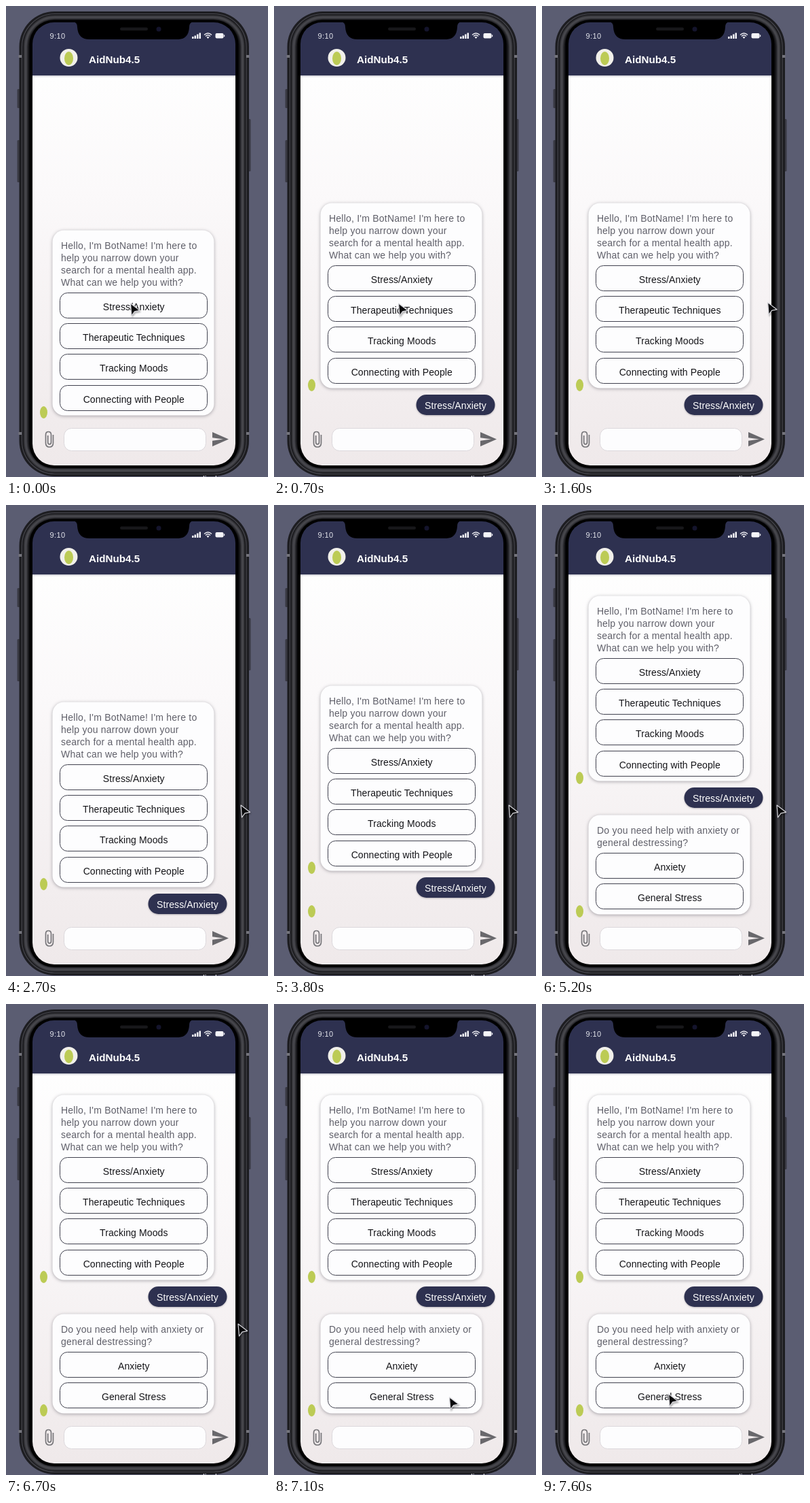
Animation, 386 px wide and 692 px high, one loop 8000 ms. Source, as an HTML page:

```html
<!DOCTYPE html>
<html lang="en">
<head>
<meta charset="utf-8">
<title>Chat assistant</title>
<style>
  html, body { margin: 0; width: 100%; height: 100%; overflow: hidden; background: #5b5d72; }
  svg { display: block; width: 100vw; height: 100vh; }
  text { font-family: "Liberation Sans", Arial, sans-serif; font-size: 14px; }
  .card { fill: #fdfdfe; filter: drop-shadow(0 1px 2.5px rgba(40, 36, 50, .38)); }
  .line { fill: #5f5f69; letter-spacing: .22px; }
  .option { fill: #fdfdfe; stroke: #41424f; stroke-width: 1; }
  .label { fill: #141418; letter-spacing: .1px; text-anchor: middle; }
  .pill { fill: #2e3150; filter: drop-shadow(0 1px 1px rgba(40, 36, 50, .3)); }
  .bot { fill: #bccb55; }
  .sheen { fill: none; stroke: #4c4c52; stroke-width: 5; filter: blur(1.6px); }
  #cursor { filter: drop-shadow(1px 2px 1px rgba(0, 0, 0, .3)); }
</style>
</head>
<body>
<svg id="stage" viewBox="0 0 386 692" xmlns="http://www.w3.org/2000/svg">
  <defs>
    <linearGradient id="paper" x1="0" y1="0" x2="0" y2="1">
      <stop offset="0" stop-color="#fefefe"/>
      <stop offset=".3" stop-color="#fbf9fa"/>
      <stop offset="1" stop-color="#efe9ea"/>
    </linearGradient>
    <linearGradient id="shade" x1="0" y1="0" x2="0" y2="1">
      <stop offset="0" stop-color="#2e3150" stop-opacity=".35"/>
      <stop offset="1" stop-color="#2e3150" stop-opacity="0"/>
    </linearGradient>
    <clipPath id="screen"><rect x="39" y="24" width="299" height="651" rx="32"/></clipPath>
  </defs>

  <rect width="386" height="692" fill="#5b5d72"/>

  <!-- phone body -->
  <g fill="#3a3a44">
    <rect x="16.5" y="122" width="4" height="28" rx="1.5"/>
    <rect x="16.5" y="197" width="4" height="62" rx="1.5"/>
    <rect x="356" y="166" width="4.5" height="77" rx="1.5"/>
  </g>
  <rect x="19.5" y="8" width="338.5" height="683" rx="52" fill="#1d1d21"/>
  <rect x="23.5" y="11.5" width="330.5" height="676" rx="48.5" fill="#101013" stroke="#48484e" stroke-width="1.2"/>
  <rect class="sheen" x="29" y="16.5" width="319.5" height="666" rx="43"/>
  <rect x="34.5" y="20.5" width="308" height="658.5" rx="36" fill="#000"/>
  <g fill="#73737b">
    <rect x="18.5" y="72" width="4.5" height="4"/>
    <rect x="354" y="72" width="4.5" height="4"/>
    <rect x="18.5" y="626" width="4.5" height="4"/>
    <rect x="354" y="626" width="4.5" height="4"/>
  </g>

  <g clip-path="url(#screen)">
    <rect x="39" y="101" width="299" height="574" fill="url(#paper)"/>
    <rect x="39" y="101" width="299" height="4" fill="url(#shade)"/>
    <rect x="39" y="24" width="299" height="78" fill="#2e3150"/>
  </g>

  <!-- notch and status bar -->
  <path d="M99 23Q105 24 105 31Q106 49 123 49H253Q269 49 270 31Q270 24 276 23Z" fill="#000"/>
  <rect x="168" y="31.5" width="41" height="4.5" rx="2.2" fill="#17171a"/>
  <circle cx="225" cy="34" r="3.5" fill="#14142c"/>
  <text x="64.5" y="47.5" fill="#e4e5ec" style="font-size:11px;letter-spacing:.4px">9:10</text>
  <g fill="#f4f4f8">
    <rect x="274" y="45" width="2.5" height="3"/>
    <rect x="277.5" y="43.5" width="2.5" height="4.5"/>
    <rect x="281" y="41.5" width="2.5" height="6.5"/>
    <rect x="284.5" y="39.5" width="2.5" height="8.5"/>
    <path d="M297.5 48L295.5 45.8Q297.5 44.3 299.5 45.8Z"/>
    <rect x="308.5" y="40" width="12" height="7.5" rx="2"/>
    <rect x="321" y="42.3" width="1.2" height="3" rx=".5"/>
  </g>
  <path d="M292 42.5Q297.5 37.5 303 42.5M294 44.5Q297.5 41.2 301 44.5" fill="none" stroke="#f4f4f8" stroke-width="1.4"/>

  <circle cx="92.5" cy="76" r="13" fill="#f1f0ea"/>
  <ellipse class="bot" cx="92.5" cy="77" rx="6.5" ry="10"/>
  <text x="122" y="84" fill="#fff" style="font-size:15.2px;font-weight:bold">AidNub4.5</text>

  <g id="chat"></g>

  <!-- message bar -->
  <rect x="85.5" y="620.5" width="209" height="33" rx="11" fill="#fdfdfe" stroke="#dcd8dc"/>
  <path d="M69.5 630V642Q69.5 648 64 648Q58.5 648 58.5 642V630Q58.5 625.5 62.5 625.5Q66.5 625.5 66.5 630V641Q66.5 643.8 64 643.8Q61.7 643.8 61.7 641V631" fill="none" stroke="#77767a" stroke-width="1.7"/>
  <path d="M304 626L328 636.5L304 647V638.8L320 636.5L304 634.2Z" fill="#69686c"/>

  <text x="286" y="699" fill="#f4f4f8" style="font-size:12px">display</text>

  <path id="cursor" d="M0 0L13.5 10.3L6 11.8L1.5 18Z" fill="#08080a" stroke="#d9d9de" stroke-width="1.2" stroke-linejoin="round"/>
</svg>
<script>
const NS = "http://www.w3.org/2000/svg";
const LOOP = 8000, STEP = 100;
const chat = document.getElementById("chat");
const cursor = document.getElementById("cursor");

function add(parent, tag, attrs, text) {
  const node = document.createElementNS(NS, tag);
  for (const key in attrs) node.setAttribute(key, attrs[key]);
  if (text) node.textContent = text;
  parent.appendChild(node);
  return node;
}

function rect(parent, cls, x, y, width, height, rx) {
  return add(parent, "rect", { class: cls, x, y, width, height, rx });
}

function avatar(parent, y) {
  return add(parent, "ellipse", { class: "bot", cx: 55.5, cy: y, rx: 5.5, ry: 9 });
}

// Card with its top edge at y = 0
function card(lines, options, height) {
  const g = add(chat, "g", {});
  rect(g, "card", 68.5, 0, 238, height, 17);
  lines.forEach((s, i) => add(g, "text", { class: "line", x: 81, y: 27.5 + 18 * i }, s));
  const top = 20 + 18 * lines.length;
  options.forEach((s, i) => {
    const y = top + Math.round(45.2 * i);
    rect(g, "option", 79.5, y, 217, 37, 11);
    add(g, "text", { class: "label", x: 188.3, y: y + 25.5 }, s);
  });
  return g;
}

const intro = card(
  ["Hello, I'm BotName! I'm here to", "help you narrow down your",
   "search for a mental health app.", "What can we help you with?"],
  ["Stress/Anxiety", "Therapeutic Techniques", "Tracking Moods", "Connecting with People"], 272);
avatar(intro, 267.5);

const reply = add(intro, "g", {});
rect(reply, "pill", 209.5, 281.5, 116, 30, 15);
add(reply, "text", { class: "label", x: 267.5, y: 302, style: "fill:#fff" }, "Stress/Anxiety");

const followUp = card(
  ["Do you need help with anxiety or", "general destressing?"],
  ["Anxiety", "General Stress"], 146);
followUp.setAttribute("transform", "translate(0 455.5)");
const typing = avatar(chat, 597);

const show = (node, on) => node.setAttribute("visibility", on ? "visible" : "hidden");
const clamp = v => Math.min(1, Math.max(0, v));
const smooth = k => k * k * (3 - 2 * k);

function bezier(a, b, c, k) {
  return a.map((v, i) => (1 - k) ** 2 * v + 2 * k * (1 - k) * b[i] + k * k * c[i]);
}

function pointer(t) {
  if (t < 6700) return bezier([183.5, 437], [255, 402], [346, 441], smooth(clamp((t - 1100) / 600)));
  return bezier([342, 470], [300, 612], [186.5, 573], Math.sin(clamp((t - 6700) / 900) * Math.PI / 2));
}

function draw(time) {
  const t = Math.floor((time % LOOP) / STEP) * STEP;
  const top = t < 700 ? 329.5 : t < 3800 ? 289.5 : t < 3900 ? 265.5 : 133.5;
  intro.setAttribute("transform", `translate(0 ${top})`);
  show(reply, t >= 700);
  show(typing, t >= 3800);
  show(followUp, t >= 3900);
  cursor.setAttribute("transform", `translate(${pointer(t)})`);
}

let start;
function tick(now) {
  start ??= now;
  draw(now - start);
  requestAnimationFrame(tick);
}
draw(0);
requestAnimationFrame(tick);
</script>
</body>
</html>
```
